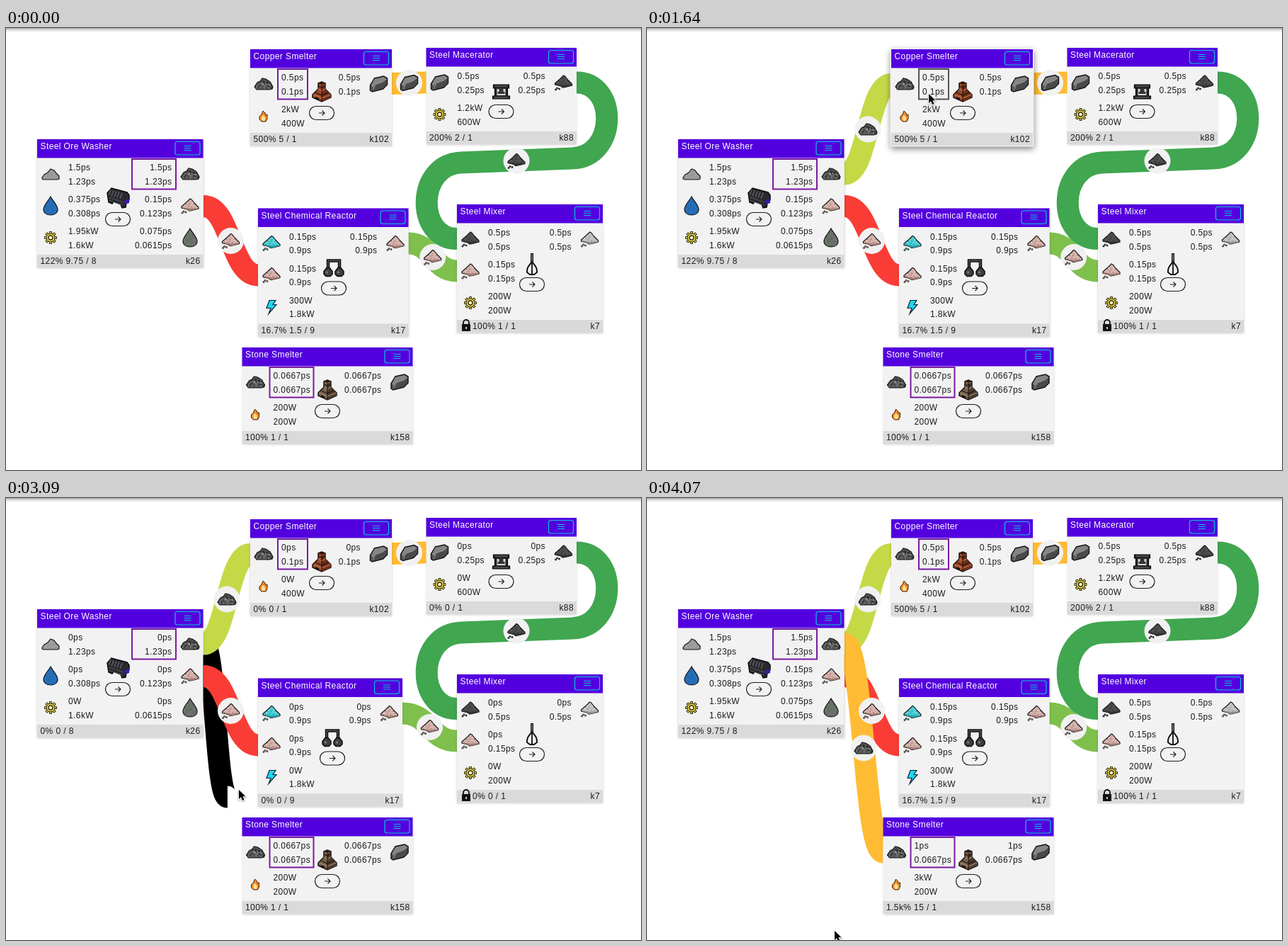
Animation of 897x624 px, one loop 4320 ms. Source, as an HTML page with a canvas:

```html
<!DOCTYPE html>
<html lang="en">
<head>
<meta charset="utf-8">
<title>Factory planner</title>
<style>
html, body { margin: 0; width: 100%; height: 100%; overflow: hidden; background: #fff; }
canvas { display: block; }
</style>
</head>
<body>
<canvas id="stage" width="897" height="624"></canvas>
<script>
const ctx = document.getElementById('stage').getContext('2d');
const LOOP = 4320, STALL = 1800, RESUME = 3830;
const FIRST_DRAG = 980, FIRST_DROP = 1300, SECOND_DRAG = 2840, SECOND_DROP = 3410;
const PURPLE = '#5300df', CYAN = '#08c4dc', GREEN = '#40a650', AMBER = '#ffbb33';
let t = 0, stalled = false, cursor = null, drag = false, dragAge = 0;

// Rows: input icon, used, capacity, then the same for the output. "a|b" changes on resume.
const cards = [
  { name: 'Steel Ore Washer', x: 44, y: 157, w: 234.5, cx: 158, machine: 'washer', my: 83,
    foot: '122% 9.75 / 8', key: 'k26', box: [134, 62],
    rows: ['heap 1.5ps 1.23ps ore 1.5ps 1.23ps', 'water 0.375ps 0.308ps pink 0.15ps 0.123ps',
           'gear 1.95kW 1.6kW sludge 0.075ps 0.0615ps'] },
  { name: 'Copper Smelter', x: 345, y: 30, w: 200, cx: 446, machine: 'copperSmelter', my: 60,
    foot: '500% 5 / 1', key: 'k102', box: [39, 42], green: [1220, FIRST_DROP],
    rows: ['ore 0.5ps 0.1ps ingot 0.5ps 0.1ps', 'fire 2kW 400W'] },
  { name: 'Steel Macerator', x: 593.5, y: 28, w: 212.5, cx: 699.5, machine: 'macerator', my: 62,
    foot: '200% 2 / 1', key: 'k88',
    rows: ['ingot 0.5ps 0.25ps dark 0.5ps 0.25ps', 'gear 1.2kW 600W'] },
  { name: 'Steel Chemical Reactor', x: 356, y: 254.5, w: 212.5, cx: 463, machine: 'reactor', my: 84,
    foot: '16.7% 1.5 / 9', key: 'k17', shrinks: true,
    rows: ['cyan 0.15ps 0.9ps pink 0.15ps 0.9ps', 'pink 0.15ps 0.9ps', 'bolt 300W 1.8kW'] },
  { name: 'Steel Mixer', x: 637, y: 249, w: 206, cx: 743, machine: 'mixer', my: 85,
    foot: '100% 1 / 1', key: 'k7', locked: true,
    rows: ['dark 0.5ps 0.5ps light 0.5ps 0.5ps', 'pink 0.15ps 0.15ps', 'gear 200W 200W'] },
  { name: 'Stone Smelter', x: 333.5, y: 451, w: 241, cx: 454, machine: 'stoneSmelter', my: 60,
    foot: '100% 1 / 1|1.5k% 15 / 1', key: 'k158', box: [39, 62], green: [3170, SECOND_DROP],
    rows: ['ore 0.0667ps|1ps 0.0667ps ingot 0.0667ps|1ps 0.0667ps', 'fire 200W|3kW 200W'] },
];

// Pointer: time, x, y
const track = [
  [80, 748, 488], [560, 262, 203], [900, 262, 203], [980, 285, 192], [1140, 351, 133],
  [1220, 360, 90], [1300, 362, 74], [1560, 362, 74], [1640, 398, 93], [2040, 317, 189],
  [2120, 314, 206], [2200, 308, 214], [2680, 264, 201], [2760, 264, 201], [2840, 285, 230],
  [3250, 360, 541], [3330, 353, 515], [3410, 350, 494], [3670, 350, 494], [3750, 342, 500],
  [4070, 265, 611], [LOOP, 265, 611],
];

function pointerAt(time) {
  const i = track.findIndex(k => k[0] > time) - 1;
  if (i < 0) return null;
  const [a, b] = [track[i], track[i + 1]];
  const u = Math.floor((time - a[0]) / 80) * 80 / (b[0] - a[0]);
  return { x: a[1] + (b[1] - a[1]) * u, y: a[2] + (b[2] - a[2]) * u };
}

const within = (x, y, w, h) =>
  cursor && cursor.x >= x && cursor.x < x + w && cursor.y >= y && cursor.y < y + h;
const isGreen = c => c.green && t >= c.green[0] && t < c.green[1];

function shape(d, fill, stroke, width = 1.2) {
  const p = new Path2D(d);
  if (fill) { ctx.fillStyle = fill; ctx.fill(p); }
  if (stroke) { ctx.strokeStyle = stroke; ctx.lineWidth = width; ctx.stroke(p); }
}

function speckled(d, fill, tones, n = 60) {
  let seed = 77;
  const rnd = () => (seed = seed * 16807 % 2147483647) / 2147483647;
  shape(d, fill);
  ctx.save();
  ctx.clip(new Path2D(d));
  for (let i = 0; i < n; i++) {
    ctx.fillStyle = tones[i % tones.length];
    ctx.fillRect(Math.round(rnd() * 17 - 9) * 1.6, Math.round(rnd() * 15 - 8) * 1.6, 1.6, 1.6);
  }
  ctx.restore();
  shape(d, null, '#181818');
}

function dust(fill, light, shade) {
  speckled('M0-10L2-9L6-4L12 2L12 4L5 6L-1 7L-4 5L-12 3L-12 1L-5-5Z', fill, [light, shade, fill], 90);
  shape('M-11 3L-4 5L-1 7L5 6L12 4L8 3L1 4L-4 3Z', shade);
  shape('M-10 7h2v2h-2zM-7 8h2v2h-2zM-12 9h2v2h-2z', shade, '#222', .6);
}

function smelter(base, dark, light) {
  shape('M-5-12L0-14L5-12V-4L13 4V8L0 14L-13 8V4L-5-4Z', base, '#1c1210', 1.5);
  shape('M0-9L5-11V-4L13 4V8L0 14Z', dark);
  shape('M-4-12L0-13L4-12L0-10Z', '#221815');
  shape('M-5-4L0-1L5-4M-12 4L0 9L12 4', null, light);
  shape('M-5-8L0-6L5-8M-9 1L0 5L9 1M0-9V13', null, '#26150e');
  shape('M-9 7L-4 9V12L-9 10Z', '#1a1210');
}

function drop(fill, light, dark) {
  speckled('M0-13C3-7 10-1 10 5C10 10 6 13 0 13S-10 10-10 5C-10-1-3-7 0-13Z', fill, [light, dark], 50);
}

const icons = {
  heap: () => speckled('M-12 5L-9 1L-4-2L0-7L5-5L8-1L12 3V7L9 8H-10L-12 7Z', '#9b9b9b', ['#aaa', '#919191'], 40),
  ore: () => speckled('M-13 4L-9-2L-5-4L-2-8L3-7L9-3L13 4L12 7L8 8H-10Z', '#555', ['#222', '#8f8f8f', '#444', '#777'], 170),
  pink: () => dust('#d3b0aa', '#ecd0ca', '#a67c76'),
  cyan: () => dust('#48ccd2', '#98eeec', '#239da8'),
  dark: () => dust('#4b4b4e', '#656568', '#313134'),
  light: () => dust('#c0c0c0', '#e2e2e2', '#929292'),
  ingot() {
    shape('M-12 2L-6-8L7-11L12-8V1L6 7L-9 11L-12 9Z', '#555', '#151515', 1.5);
    shape('M-11 2L-6-7L7-10L11-7L6-3L-5 1L-8 5Z', '#858585');
    shape('M-5 1L6-3L11-7V1L6 6L-8 10Z', '#4a4a4a');
    shape('M-5 1L-8 9M-5 1L6-3L11-7', null, '#a4a4a4', .8);
  },
  water: () => drop('#246db5', '#2f7bc3', '#2065aa'),
  sludge: () => drop('#687068', '#7f887c', '#525b52'),
  gear() {
    ctx.save();
    for (let i = 0; i < 8; i++) {
      ctx.rotate(Math.PI / 4);
      shape('M-1.6-8.5H1.6V-5H-1.6Z', '#dfca4a', '#34300f', 1);
    }
    ctx.restore();
    shape('M6 0A6 6 0 1 1-6 0A6 6 0 1 1 6 0', '#e6d251', '#34300f', 1);
    shape('M3 0A3 3 0 1 1-3 0A3 3 0 1 1 3 0', '#fff8cb', '#34300f', 1.4);
  },
  fire() {
    shape('M-1-7L2-4L3-1L5-2V4L3 8H-3L-6 5V1L-3-2Z', '#f58b26', '#40220f', 1);
    shape('M-1-1L2 2V6L1 7H-2L-3 5V2Z', '#ffe095');
  },
  bolt: () => shape('M-3-9H6L2-3H7L-4 10L-1 2H-7Z', '#20d6f2', '#123'),
  lock() {
    shape('M-4-1V-4A4 4 0 0 1 4-4V-1', null, '#111', 1.8);
    shape('M-6-2H6V8H-6Z', '#111');
    shape('M-1 2H1V5H-1Z', '#ccc');
  },
  copperSmelter: () => smelter('#9c4a29', '#6f2f1b', '#c87850'),
  stoneSmelter: () => smelter('#77634d', '#4a3c30', '#a08a70'),
  washer() {
    shape('M-15-7L-9-14L13-8L16-4V3L12 7L11 13L6 14L4 9L-6 5L-8 8L-13 6Z', '#29292e', '#0b0b0d', 1.5);
    for (let i = -10; i < 10; i += 4) shape(`M${i} ${i * .3 - 9}l-3 8`, null, '#65656c', 1.3);
    shape('M-13-1L8 6M-13 3L7 10', null, '#55555c');
    shape('M9 3L16 1V7L10 9Z', '#4317a8');
  },
  macerator() {
    shape('M-11-10H11V-5H9V6H12V10H-12V6H-9V-5H-11Z', '#242424', '#080808');
    shape('M-6-4H6V5H-6Z', '#d9d9d9');
    shape('M-3-5H3V0H5V3H-5V0H-3Z', '#333');
    shape('M-9-8H9M-10 8H10', null, '#777');
  },
  reactor() {
    shape('M-8 3V-10H8V3', null, '#111', 4.5);
    shape('M-8 3V-10H8V3', null, '#555', 1.4);
    for (const x of [-8, 8]) {
      shape(`M${x - 2} 0H${x + 2}L${x + 6} 5V9L${x + 3} 12H${x - 3}L${x - 6} 9V5Z`, '#3f3f42', '#0c0c0c', 1.5);
      shape(`M${x - 3} 5h3v3h-3z`, '#777');
    }
  },
  mixer() {
    shape('M0-16V-3', null, '#111', 4);
    shape('M0-15V-3', null, '#aaa', 1.2);
    shape('M0-4C-4 1-8 5-7 11L-3 14H3L7 11C8 5 4 1 0-4Z', '#eee', '#111', 2);
    shape('M0-4V13', null, '#222', 2);
  },
};

function icon(name, x, y) {
  ctx.save();
  ctx.translate(x, y);
  icons[name]();
  ctx.restore();
}

function text(s, x, baseline, color, align = 'left') {
  ctx.fillStyle = color;
  ctx.textAlign = align;
  ctx.fillText(s, x, baseline);
}

function roundBox(x, y, w, h, r, fill, stroke, width = 1.2) {
  ctx.beginPath();
  ctx.roundRect(x, y, w, h, r);
  if (fill) { ctx.fillStyle = fill; ctx.fill(); }
  if (stroke) { ctx.strokeStyle = stroke; ctx.lineWidth = width; ctx.stroke(); }
}

function withShadow(blur, dy, alpha, draw) {
  ctx.save();
  ctx.shadowColor = `rgba(0,0,0,${alpha})`;
  ctx.shadowBlur = blur;
  ctx.shadowOffsetY = dy;
  draw();
  ctx.restore();
}

function live(s) {
  const [now, later] = s.split('|');
  if (later) return t >= RESUME ? later : now;
  return stalled ? now.replace(/[\d.]+k?(%|ps|W)/, '0$1').replace(/ [\d.]+ \//, ' 0 /') : now;
}

function slot(name, x, y, green, source) {
  const hot = within(x - 18.5, y - 18.5, 37, 37);
  if (hot || source) {
    withShadow(8, 3, .4, () =>
      roundBox(x - 18.5, y - 18.5, 37, 37, 3, source ? '#d8d8d8' : green ? '#e2e2e2' : '#f0f0f0'));
  }
  icon(hot && green ? 'ore' : name, x, y);
}

function drawCard(c) {
  const { x, y } = c;
  const w = c.w - (c.shrinks && stalled ? 8.5 : 0), cx = c.cx - (c.shrinks && stalled ? 2 : 0);
  const right = x + w, h = 46 + 45 * c.rows.length, foot = y + h - 18;
  const hover = within(x, y, w, h);
  const green = isGreen(c);
  const ink = green ? '#fff' : '#1c1c1c';
  const [blur, dy, alpha] = green ? [2, 0, .1] : hover ? [9, 3, .5] : [3, 1, .2];

  withShadow(blur, dy, alpha, () => {
    ctx.fillStyle = green ? GREEN : '#f2f2f2';
    const grow = hover ? 1.5 : 0;
    ctx.fillRect(x - grow, y - grow, w + 2 * grow, h + 2 * grow);
  });
  ctx.fillStyle = PURPLE;
  ctx.fillRect(x, y, w, 26.5);
  ctx.fillStyle = '#dadada';
  ctx.fillRect(x, foot, w, 18);
  text(c.name, x + 4.5, y + 14, '#fff');
  roundBox(right - 39.5, y + 3.5, 35, 18.5, 3, null, CYAN);
  shape(`M${right - 27} ${y + 9.5}h10m-10 3h10m-10 3h10`, null, CYAN, 1.1);

  c.rows.forEach((row, i) => {
    const [inIcon, used, cap, outIcon, made, outCap] = row.split(' ');
    const top = y + 44 + 45 * i, mid = y + 49 + 45 * i;
    slot(inIcon, x + 19, mid, green);
    text(live(used), x + 44, top, ink);
    text(cap, x + 44, top + 19.7, ink);
    if (!outIcon) return;
    const source = drag && dragAge < 250 && c === cards[0] && i === 0;
    slot(outIcon, right - 18.5, mid, green, source);
    text(live(made), right - 44, top, ink, 'right');
    text(outCap, right - 44, top + 19.7, ink, 'right');
  });

  if (c.box) {
    const [bx, bw] = c.box;
    const hot = within(x + bx, y + 28, bw, 43);
    roundBox(x + bx, y + 28, bw, 42.5, 0, null, hot ? '#555' : '#7a1aa0', 2);
  }

  icon(c.machine, cx, y + c.my);
  const by = y + (c.rows.length > 2 ? 113 : 90);
  roundBox(cx - 17.5, by - 9.5, 35, 19, 9.5, null, ink);
  shape(`M${cx - 4} ${by}h8m-3.5 -3.5l3.5 3.5l-3.5 3.5`, null, ink, 1.1);

  if (c.locked) icon('lock', x + 13, foot + 8);
  text(live(c.foot), x + (c.locked ? 22 : 4.5), foot + 13.2, ink);
  text(c.key, right - 4, foot + 13.2, ink, 'right');
}

function link(x1, y1, x2, y2, color) {
  const mx = (x1 + x2) / 2;
  shape(`M${x1} ${y1}C${mx} ${y1} ${mx} ${y2} ${x2} ${y2}`, null, color, 31);
}

// A dragged link snaps to the nearest input of a card that accepts it.
function dragEnd() {
  const c = cards.find(isGreen);
  if (!c) return [cursor.x - 16, cursor.y + 10];
  const row = Math.max(0, Math.min(c.rows.length - 1, Math.round((cursor.y - c.y - 49) / 45)));
  return [c.x, c.y + 49 + 45 * row];
}

function badge(name, x, y) {
  roundBox(x - 18.5, y - 18.5, 37, 37, 18.5, '#f1f1f1');
  icon(name, x, y);
}

function drawLinks() {
  const reactorOut = stalled ? 560 : 568.5;
  if (drag) link(279, 206, ...dragEnd(), '#000');
  link(279, 251.5, 356, 349, '#f93d36');
  link(545, 78.5, 594, 77, AMBER);
  link(reactorOut, 304, 637, 343, '#7fc04d');
  shape('M806 77C864 77 864 181.5 800 184L643 190C579 192.5 579 297.5 637 297.5', null, GREEN, 31);
  if (t >= FIRST_DROP) link(279, 206, 345, 79.5, '#c5d947');
  if (t >= SECOND_DROP) link(279, 206, 333.5, 500, AMBER);

  badge('pink', 317.5, 300.5);
  badge('ingot', 569.5, 77.5);
  badge('pink', (reactorOut + 637) / 2, 323.5);
  badge('dark', 721, 187.5);
  if (t >= FIRST_DROP) badge('ore', 312, 143);
  if (t >= SECOND_DROP) badge('ore', 306, 353);
}

function drawCursor() {
  const arrow = 'M0 0V13L3 10.2L5.2 15L7.6 14L5.4 9.2H9.5Z';
  ctx.save();
  ctx.translate(cursor.x, cursor.y);
  withShadow(2, 1, .4, () => shape(arrow, null, '#fff', 2));
  shape(arrow, '#000');
  ctx.restore();
}

const topShade = ctx.createLinearGradient(0, 0, 0, 6);
topShade.addColorStop(0, '#a2a2a2');
topShade.addColorStop(.4, '#d8d8d8');
topShade.addColorStop(1, '#fff');

const start = performance.now();

function frame() {
  t = (performance.now() - start) % LOOP;
  stalled = t >= STALL && t < RESUME;
  cursor = pointerAt(t);
  drag = (t >= FIRST_DRAG && t < FIRST_DROP) || (t >= SECOND_DRAG && t < SECOND_DROP);
  dragAge = t - (t < SECOND_DRAG ? FIRST_DRAG : SECOND_DRAG);

  ctx.fillStyle = '#fff';
  ctx.fillRect(0, 0, 897, 624);
  ctx.fillStyle = topShade;
  ctx.fillRect(0, 0, 897, 6);
  ctx.font = '12px "Liberation Sans", Arial, sans-serif';
  ctx.letterSpacing = '0.4px';
  drawLinks();
  cards.forEach(drawCard);
  if (cursor) drawCursor();
  requestAnimationFrame(frame);
}
frame();
</script>
</body>
</html>
```
